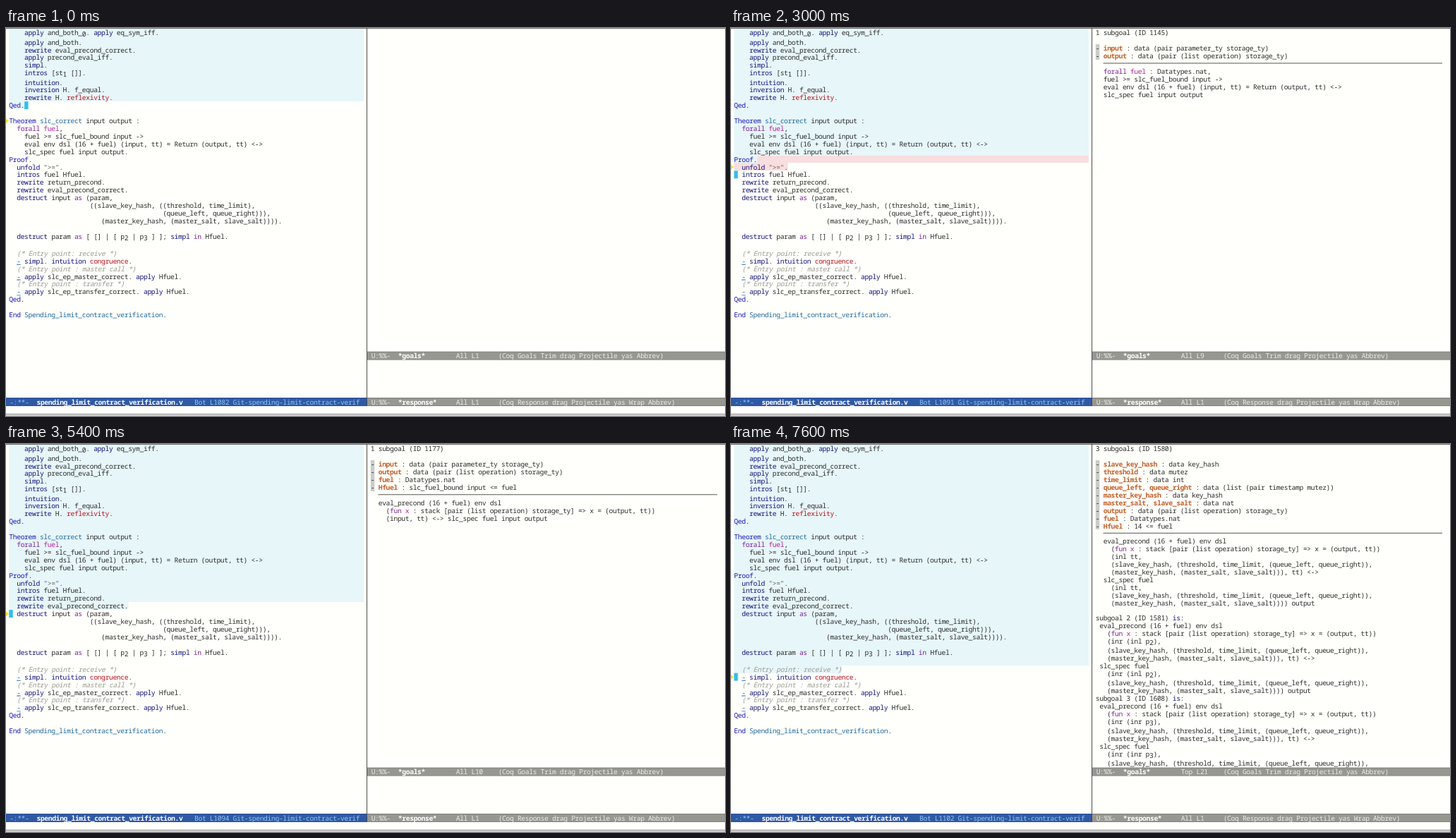
Recreate the animation shown at these times as an HTML page. Size 1019 px wide and 550 px high, loop 8 s.

```html
<!DOCTYPE html>
<html lang="en">
<head>
<meta charset="utf-8">
<title>Proof stepping</title>
<style>
  html, body { margin: 0; width: 100%; height: 100%; overflow: hidden; background: #fffffb; }
  svg { display: block; width: 100vw; height: 100vh; }
  text {
    font: 9.7px "Noto Sans Mono", "DejaVu Sans Mono", monospace;
    letter-spacing: -0.366px;
    white-space: pre;
    text-rendering: geometricPrecision;
    /* An invisible turn keeps baselines from snapping to whole pixels. */
    transform: rotate(0.002deg);
    fill: #2c2c2c;
  }
  .cmd { fill: #1a1ab8; }
  .tac { fill: #14147c; }
  .end { fill: #b8141e; }
  .key { fill: #7a2299; }
  .var { fill: #b0249c; }
  .def { fill: #22699c; }
  .com { fill: #9c9c92; font-style: italic; }
  .str { fill: #66665a; }
  .bul { fill: #1f6fa5; text-decoration: underline; }
  .hyp { fill: #c2602a; font-weight: bold; }
  .lit { fill: #f4fbff; }
  .bar { fill: #ecece6; }
  .act { fill: #8ec6f2; }
  .buf { fill: #fff; font-weight: bold; }
</style>
</head>
<body>
<svg id="stage" viewBox="0 0 1019 550" preserveAspectRatio="none"></svg>
<script>
const LOOP = 8000, CELL = 5.454, ROW = 10.91, TOP = 1.4, BASE = 9.05, SUB_DROP = 2.3;
const LEFT = 4.3, LEFT_END = 507, RIGHT = 516.8, FIRST_LINE = 1073;
const BLUE = '#e7f6f9', PINK = '#f9dedf', CURSOR = '#35bdec';

const script = `    apply and_both_₀. apply eq_sym_iff.
    apply and_both.
    rewrite eval_precond_correct.
    apply precond_eval_iff.
    simpl.
    intros [st₁ []].
    intuition.
    inversion H. f_equal.
    rewrite H. reflexivity.
Qed.

Theorem slc_correct input output :
  forall fuel,
    fuel >= slc_fuel_bound input ->
    eval env dsl (16 + fuel) (input, tt) = Return (output, tt) <->
    slc_spec fuel input output.
Proof.
  unfold ">=".
  intros fuel Hfuel.
  rewrite return_precond.
  rewrite eval_precond_correct.
  destruct input as (param,
                     ((slave_key_hash, ((threshold, time_limit),
                                        (queue_left, queue_right))),
                        (master_key_hash, (master_salt, slave_salt)))).

  destruct param as [ [] | [ p₂ | p₃ ] ]; simpl in Hfuel.

  (* Entry point: receive *)
  - simpl. intuition congruence.
  (* Entry point : master call *)
  - apply slc_ep_master_correct. apply Hfuel.
  (* Entry point : transfer *)
  - apply slc_ep_transfer_correct. apply Hfuel.
Qed.

End Spending_limit_contract_verification.`.split('\n');

// Goal buffers
const inputHyp = 'input : data (pair parameter_ty storage_ty)';
const outputHyp = 'output : data (pair (list operation) storage_ty)';
const fuelHyp = 'fuel : Datatypes.nat';
const boundHyp = 'Hfuel : slc_fuel_bound input <= fuel';
const evalLine = 'eval env dsl (16 + fuel) (input, tt) = Return (output, tt) <->';
const specLine = 'slc_spec fuel input output';
const precondLine = 'eval_precond (16 + fuel) env dsl';
const funLine = '  (fun x : stack [pair (list operation) storage_ty] => x = (output, tt))';
const slaveLine = '(slave_key_hash, (threshold, time_limit, (queue_left, queue_right)),';
const masterLine = '(master_key_hash, (master_salt, slave_salt)))';
const storageHyps = [
  'slave_key_hash : data key_hash',
  'threshold : data mutez',
  'time_limit : data int',
  'queue_left, queue_right : data (list (pair timestamp mutez))',
  'master_key_hash : data key_hash',
  'master_salt, slave_salt : data nat',
  outputHyp, fuelHyp
];

const indent = (lines, n) => lines.map(l => ' '.repeat(n) + l);

function goal(title, hyps, lines) {
  const marked = hyps.map(h => (h[0] === ' ' ? '' : '- ') + h);
  return [title, '', ...marked, '=', ...indent(lines, 2)];
}

const conclusion = param => [
  precondLine, funLine, `  (${param},`, '  ' + slaveLine, `  ${masterLine}, tt) <->`,
  'slc_spec fuel', `  (${param},`, '  ' + slaveLine, `  ${masterLine}) output`
];

const subgoal = (n, id, param) =>
  [`subgoal ${n} (ID ${id}) is:`, ...indent(conclusion(param), 1)];

const one = id => `1 subgoal (ID ${id})`;
const startHyps = [inputHyp, outputHyp];
const introHyps = [...startHyps, fuelHyp, boundHyp];

const goals = [
  [''],
  goal(one(1145), startHyps,
    ['forall fuel : Datatypes.nat,', 'fuel >= slc_fuel_bound input ->', evalLine, specLine]),
  goal(one(1146), startHyps,
    ['forall fuel : Datatypes.nat,', 'slc_fuel_bound input <= fuel ->', evalLine, specLine]),
  goal(one(1148), introHyps, [evalLine, specLine]),
  goal(one(1162), introHyps,
    ['precond (eval env dsl (16 + fuel) (input, tt))', funLine + ' <->', specLine]),
  goal(one(1177), introHyps, [precondLine, funLine, '  (input, tt) <-> ' + specLine]),
  goal(one(1474),
    ['param : data parameter_ty', ...storageHyps, 'Hfuel : slc_fuel_bound',
      ...indent(['(param,', slaveLine, masterLine + ') <= fuel'], 12)],
    conclusion('param')),
  [...goal('3 subgoals (ID 1580)', [...storageHyps, 'Hfuel : 14 <= fuel'], conclusion('inl tt')),
    '', ...subgoal(2, 1581, 'inr (inl p₂)'),
    ...subgoal(3, 1608, 'inr (inr p₃)').slice(0, -1)]
];

// [time, last checked row, last row being checked (0 = none), goal, cursor shown]
const steps = [
  [0, 9, 0, 0, 1], [100, 9, 0, 0, 0], [600, 9, 0, 0, 1],
  [1000, 9, 15, 0, 1], [1100, 15, 0, 1, 1], [1700, 15, 0, 1, 0],
  [2100, 15, 16, 1, 1], [2200, 16, 0, 1, 1], [2600, 16, 0, 1, 0],
  [3000, 16, 17, 1, 1], [3100, 17, 0, 2, 1], [3600, 17, 0, 2, 0],
  [3900, 17, 18, 2, 1], [4000, 18, 0, 3, 1], [4400, 18, 0, 3, 0],
  [4600, 19, 0, 4, 1], [5300, 19, 20, 4, 1], [5400, 20, 0, 5, 1],
  [6100, 24, 0, 6, 1], [6900, 26, 0, 7, 1], [7600, 28, 0, 7, 1]
];

// Drawing helpers
const syntax = new RegExp([
  '(?<com>\\(\\*.*\\*\\))',
  '(?<cmd>\\b(?:Qed|Proof|Theorem|End)\\b)',
  '(?<tac>\\b(?:apply|rewrite|simpl|intros|intuition|inversion|unfold|destruct|is)\\b)',
  '(?<end>\\b(?:reflexivity|congruence)\\b)',
  '(?<key>\\b(?:forall|fun|as|in)\\b)',
  '(?<var>(?<=forall )fuel|(?<=fun )x\\b)',
  '(?<def>\\bslc_correct\\b|Spending_limit_contract_verification)',
  '(?<str>".*?")',
  '(?<bul>(?<=^  )-(?= ))',
  '(?<sub>[₀-₃])'
].join('|'), 'g');

const escape = s => s.replace(/&/g, '&amp;').replace(/</g, '&lt;').replace(/>/g, '&gt;');

const paint = s => escape(s).replace(syntax, (word, ...rest) => {
  const groups = rest[rest.length - 1];
  const kind = Object.keys(groups).find(k => groups[k] !== undefined);
  return kind === 'sub'
    ? `<tspan baseline-shift="-2.4">${word.charCodeAt(0) - 0x2080}</tspan>`
    : `<tspan class="${kind}">${word}</tspan>`;
});

const rect = (x, y, w, h, fill) =>
  `<rect x="${x}" y="${y}" width="${w}" height="${h}" fill="${fill}"/>`;
const text = (x, y, body, kind = '') => `<text x="${x}" y="${y}" class="${kind}">${body}</text>`;

// Rows holding a subscript are a little taller.
function rowTops(lines) {
  const tops = [TOP];
  lines.forEach((l, i) => tops.push(tops[i] + ROW + (/[₀-₃]/.test(l) ? SUB_DROP : 0)));
  return tops;
}

const tops = rowTops(script);
const edge = row => Math.round(tops[row]);
const textEnd = row => LEFT + script[row].length * CELL;
const band = (x, from, to, right, fill) =>
  to > from ? rect(x, edge(from), right - x, edge(to) - edge(from), fill) : '';

const scriptText = script.map((l, i) => text(LEFT, tops[i] + BASE, paint(l))).join('');

function drawScript(done, busy, shown) {
  const waiting = done === 9 && !busy;
  const row = waiting ? 9 : (busy || done) + 1;
  const col = waiting ? 4 : 0;
  let out = band(LEFT, 0, done, LEFT_END, BLUE) + band(LEFT, done, done + 1, textEnd(done), BLUE);
  if (busy) {
    out += band(textEnd(done), done, done + 1, LEFT_END, PINK)
      + band(LEFT, done + 1, busy, LEFT_END, PINK)
      + band(LEFT, busy, busy + 1, textEnd(busy), PINK);
  }
  const next = script.findIndex((l, i) => i > done && l);
  const y = tops[next] + 5.6;
  out += `<path d="M0 ${y - 3.2}L4 ${y}L0 ${y + 3.2}z" fill="#f4e61c"/>` + scriptText;
  if (shown) {
    const x = LEFT + col * CELL;
    out += rect(x, tops[row], CELL, ROW, CURSOR)
      + text(x, tops[row] + BASE, (script[row][col] || '').trim(), 'lit');
  }
  return out + drawBar(0, 511, 524, 5.3, '-:**-', 'spending_limit_contract_verification.v',
    [[48, `Bot L${FIRST_LINE + row} Git-spending-limit-contract-verif`]], true);
}

function drawGoal(index) {
  const lines = goals[index], ys = rowTops(lines);
  let out = '';
  lines.forEach((line, i) => {
    const base = ys[i] + BASE;
    if (line === '=') {
      out += rect(527.5, ys[i] + 4.4, 480.5, 1, '#555');
    } else if (line.startsWith('- ')) {
      const cut = line.indexOf(' :');
      const top = Math.round(ys[i]);
      out += rect(RIGHT, top, CELL, Math.round(ys[i] + ROW) - top, '#cbcbc8')
        + text(RIGHT, base, `-<tspan class="hyp">${line.slice(1, cut)}</tspan>${paint(line.slice(cut))}`);
    } else {
      out += text(RIGHT, base, paint(line));
    }
  });
  const place = index === 7 ? 'Top L21' : `All L${lines.length}`;
  return out
    + drawBar(512, 507, 458.6, 517.7, 'U:%%-', '*goals*',
      [[22, place], [33, '(Coq Goals Trim drag Projectile yas Abbrev)']])
    + drawBar(512, 507, 524, 517.7, 'U:%%-', '*response*',
      [[22, 'All L1'], [33, '(Coq Response drag Projectile yas Wrap Abbrev)']]);
}

function drawBar(x, w, y, tx, flags, name, parts, active) {
  const kind = active ? 'act' : 'bar', base = y + 9.8;
  return rect(x, y, w, 12, active ? '#2d5299' : '#7c7c78')
    + rect(x, y + 0.9, w, 10.4, active ? '#3059a5' : '#979792')
    + text(tx, base, flags, kind)
    + text(tx + 7 * CELL, base, name, 'buf')
    + parts.map(([col, s]) => text(tx + col * CELL, base, s, kind)).join('');
}

const frameLines = rect(0, 0, 1019, 1, '#6a6a68') + rect(511, 0, 1, 536, '#4a4a48')
  + rect(0, 546, 1019, 1, '#dededb') + rect(0, 547, 1019, 1, '#aaaaa8')
  + rect(0, 548, 1019, 2, '#cfcfcd');

const stage = document.getElementById('stage');
let current = -1;

function update(time) {
  const index = steps.findLastIndex(s => s[0] <= time);
  if (index === current) return;
  current = index;
  const [, done, busy, goalIndex, shown] = steps[index];
  stage.innerHTML = rect(0, 0, 1019, 550, '#fffffb')
    + drawScript(done, busy, shown) + drawGoal(goalIndex) + frameLines;
}

const start = performance.now();
function tick() {
  update((performance.now() - start) % LOOP);
  requestAnimationFrame(tick);
}
tick();
</script>
</body>
</html>
```
